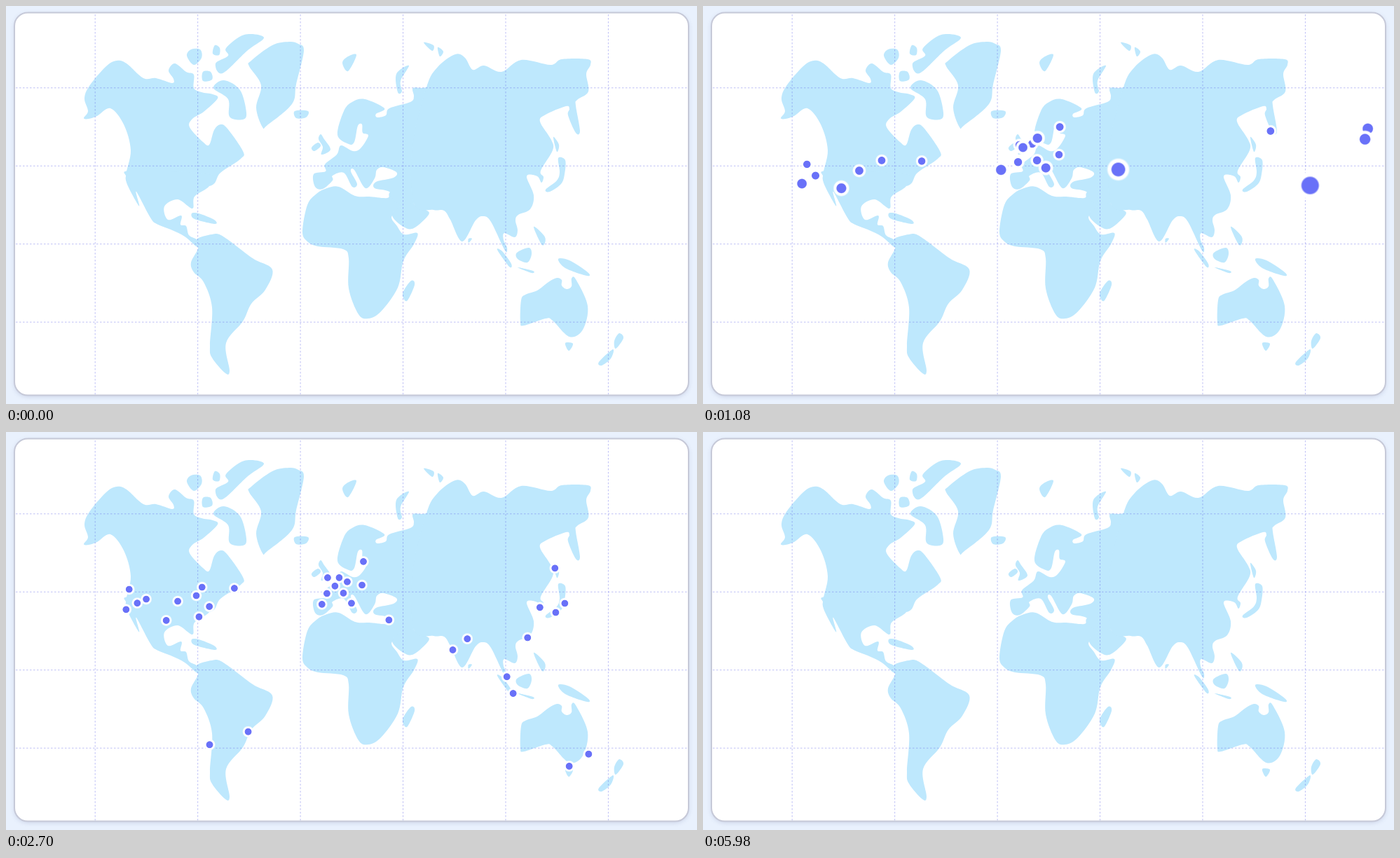
Recreate the animation shown at these times as an HTML page with a canvas. Size 986x568 px, loop 6040 ms.

```html
<!DOCTYPE html>
<html lang="en">
<head>
<meta charset="utf-8">
<title>World map</title>
<style>
html, body { margin: 0; width: 100%; height: 100%; overflow: hidden; background: #e9f1fd; }
canvas { display: block; width: 986px; height: 568px; }
</style>
</head>
<body>
<canvas id="stage" width="986" height="568"></canvas>
<script>
const WIDTH = 986, HEIGHT = 568, LOOP = 6040;
const ctx = document.getElementById('stage').getContext('2d');

// Key points of each coast; coast() joins them with a smooth closed curve.
const continents = {
  northAmerica: '111,160 117,150 112,132 119,114 143,86 158,78 172,82 196,103 214,103 237,110 239,104 232,92 241,82 257,94 268,98 268,117 279,123 295,126 302,132 282,151 266,161 262,173 281,194 290,198 297,177 306,169 316,175 338,207 335,218 306,238 290,257 230,255 180,252 171,243 178,206 168,169 149,146 130,157 118,161',
  centralAmerica: '171,243 174,257 188,283 190,283 186,265 206,302 215,311 235,319 255,329 273,344 280,340 272,333 261,327 257,314 249,312 250,299 231,305 226,286 245,276 266,289 269,272 290,257 290,240 180,235',
  southAmerica: '272,333 294,326 310,329 352,360 380,376 370,405 350,425 338,450 314,481 319,520 313,524 294,502 291,484 294,430 282,394 268,380 264,366 274,346',
  africa: '458,260 475,258 498,271 518,272 544,274 547,267 556,258 580,262 580,284 551,299 558,314 568,326 587,324 582,340 567,364 559,402 535,436 517,446 503,440 489,403 489,360 481,347 445,343 430,336 423,322 430,284 443,268',
  arabia: '563,285 551,299 567,315 582,317 603,298 599,291 588,288 582,282 575,265',
  europe: '439,240 456,236 455,226 472,212 478,199 495,207 506,203 517,185 509,181 508,169 502,171 497,194 489,197 473,184 482,150 494,137 512,133 540,146 528,154 530,159 542,156 547,146 577,137 582,129 581,117 600,116 650,100 650,265 582,281 555,280 547,265 526,260 528,251 553,245 557,237 538,230 529,234 526,246 513,260 497,234 492,236 501,254 494,258 482,238 466,242 466,249 452,261 441,258',
  asia: '600,116 616,87 641,69 655,74 666,91 682,85 707,94 735,77 777,84 793,76 830,76 834,84 828,97 831,122 815,134 813,142 819,178 813,181 802,156 804,147 799,143 770,155 762,165 778,191 780,206 763,235 767,244 764,252 758,243 743,243 753,270 748,290 731,298 727,306 730,320 726,330 711,324 710,334 715,345 712,349 692,308 681,300 670,306 651,336 634,305 625,292 610,291 582,282 580,200',
  australia: '786,388 793,391 793,399 800,404 807,400 807,389 813,390 830,428 823,462 804,472 780,449 770,446 739,456 734,451 735,420 741,412 758,406 774,394',
  greenland: '404,51 417,54 425,64 414,112 408,140 373,170 366,173 357,145 364,113 347,86 350,78 380,56'
};
const islands = [
  '340,41 368,45 344,64 309,96 299,82 317,71 314,60',
  '311,106 334,120 343,152 338,162 319,158 317,133 296,117',
  '264,62 277,62 279,74 268,84 258,71',
  '298,56 305,60 304,70 295,68',
  '281,94 292,94 294,105 281,107',
  '412,150 431,150 428,159 414,160',
  '488,72 500,70 488,93 480,81',
  '575,85 563,107 565,122 559,123 557,97',
  '596,52 610,56 608,64',
  '616,59 624,65 619,72',
  '445,195 449,200 440,207 436,202',
  '449,183 454,190 463,205 450,212 452,201 446,190',
  '265,296 275,296 297,305 298,311 269,304',
  '578,392 583,398 572,421 566,410',
  '660,332 665,332 660,338',
  '701,348 708,350 721,368 718,372',
  '746,345 750,354 744,366 730,361 729,352',
  '730,373 752,378 750,381',
  '753,315 768,328 769,338 764,340',
  '788,361 804,363 830,380 829,385 798,374',
  '798,481 809,482 803,492',
  '875,467 881,474 870,489 868,478',
  '866,490 863,503 850,513 846,508',
  '788,217 798,220 797,240 792,254 776,265 770,262 786,249 790,237',
  '781,187 789,198 786,208'
];

const points = text => text.split(' ').map(p => p.split(',').map(Number));

function coast(text) {
  const pts = points(text);
  const at = i => pts[(i + pts.length) % pts.length];
  const path = new Path2D();
  path.moveTo(...pts[0]);
  pts.forEach((p, i) => {
    const a = at(i - 1), q = at(i + 1), b = at(i + 2);
    path.bezierCurveTo(p[0] + (q[0] - a[0]) / 6, p[1] + (q[1] - a[1]) / 6,
      q[0] - (b[0] - p[0]) / 6, q[1] - (b[1] - p[1]) / 6, q[0], q[1]);
  });
  return path;
}
const land = [...Object.values(continents), ...islands].map(coast);

// Cities in order of landing; delays (s) are spread evenly over each wave.
const waves = [
  { from: .15, to: .49, cities: '326,223 176,224.5 508,218.5 783,194.5 280,221.5 510,185 200.5,238.5 459,208 475.5,208 458,230.5 481.5,230 272,233.5' },
  { from: .62, to: .83, cities: '469.5,220 493,244.5 487,214 246,241.5 291,249 451,246 796,245 783,258 189,244' },
  { from: .93, to: 1.27, cities: '760,251 546,268.5 174,253 231,268.5 277.5,263.5 636,311 741.5,294 799.5,475.5 347,425.5 656,295.5 720,372.5 711,349 825,458 293.5,442.5' }
];
const pins = waves.flatMap(({ from, to, cities }) =>
  points(cities).map(([x, y], i, all) => {
    const dx = x - WIDTH / 2, dy = y - HEIGHT / 2;
    return {
      distance: Math.hypot(dx, dy),
      angle: Math.atan2(dy, dx),
      delay: from + (to - from) * i / (all.length - 1)
    };
  }));

const clamp = v => Math.max(0, Math.min(1, v));

function disc(x, y, r, fill) {
  ctx.fillStyle = fill;
  ctx.beginPath();
  ctx.arc(x, y, r, 0, 2 * Math.PI);
  ctx.fill();
}

function softDisc(x, y, inner, outer, rgb, alpha = 1) {
  const fill = ctx.createRadialGradient(x, y, inner, x, y, outer);
  fill.addColorStop(0, `rgba(${rgb},${alpha})`);
  fill.addColorStop(1, `rgba(${rgb},0)`);
  disc(x, y, outer, fill);
}

// Each pin spirals in towards its city, as if dropping away from the viewer.
function drawPins(t) {
  const fade = clamp((5800 - t) / 600);
  const shine = clamp((t - 2900) / 920);
  for (const { distance, angle, delay } of pins) {
    const height = Math.exp(-2.8 * (t / 1000 - delay));
    const scale = Math.exp(height);
    const alpha = clamp(1.45 - .126 * scale) * fade;
    if (alpha <= 0) continue;
    const turn = (13 * height + 3 * height * height) * Math.PI / 180;
    const x = WIDTH / 2 + distance * scale * Math.cos(angle - turn);
    const y = HEIGHT / 2 + distance * scale * Math.sin(angle - turn);
    ctx.globalAlpha = alpha;
    if (shine) softDisc(x, y, 5, 25, '255,255,255', .3 * shine);
    softDisc(x, y, 7 * scale, 8.3 * scale, '255,255,255');
    softDisc(x, y, 4.4 * scale, 5.3 * scale, '105,113,248');
  }
  ctx.globalAlpha = 1;
}

function drawGrid() {
  ctx.strokeStyle = 'rgba(98,104,232,.42)';
  ctx.lineWidth = 1;
  ctx.setLineDash([2.5, 2.5]);
  ctx.beginPath();
  for (let x = 127.2; x < 900; x += 146.45) {
    ctx.moveTo(x, 12);
    ctx.lineTo(x, 555);
  }
  for (let y = 116.8; y < 500; y += 111.45) {
    ctx.moveTo(14, y);
    ctx.lineTo(973, y);
  }
  ctx.stroke();
  ctx.setLineDash([]);
}

const card = new Path2D();
card.roundRect(12, 9.5, 962, 546, 19);

function draw(t) {
  ctx.fillStyle = '#e9f1fd';
  ctx.fillRect(0, 0, WIDTH, HEIGHT);
  ctx.save();
  ctx.shadowColor = 'rgba(90,100,150,.22)';
  ctx.shadowBlur = 6;
  ctx.shadowOffsetY = 2;
  ctx.fillStyle = '#fff';
  ctx.fill(card);
  ctx.restore();

  ctx.save();
  ctx.clip(card);
  ctx.fillStyle = '#bee8fd';
  land.forEach(shape => ctx.fill(shape));
  drawGrid();
  drawPins(t);
  ctx.restore();

  ctx.strokeStyle = '#c6c9d8';
  ctx.lineWidth = 2;
  ctx.stroke(card);
}

const start = performance.now();
function tick() {
  draw((performance.now() - start) % LOOP);
  requestAnimationFrame(tick);
}
tick();
</script>
</body>
</html>
```
